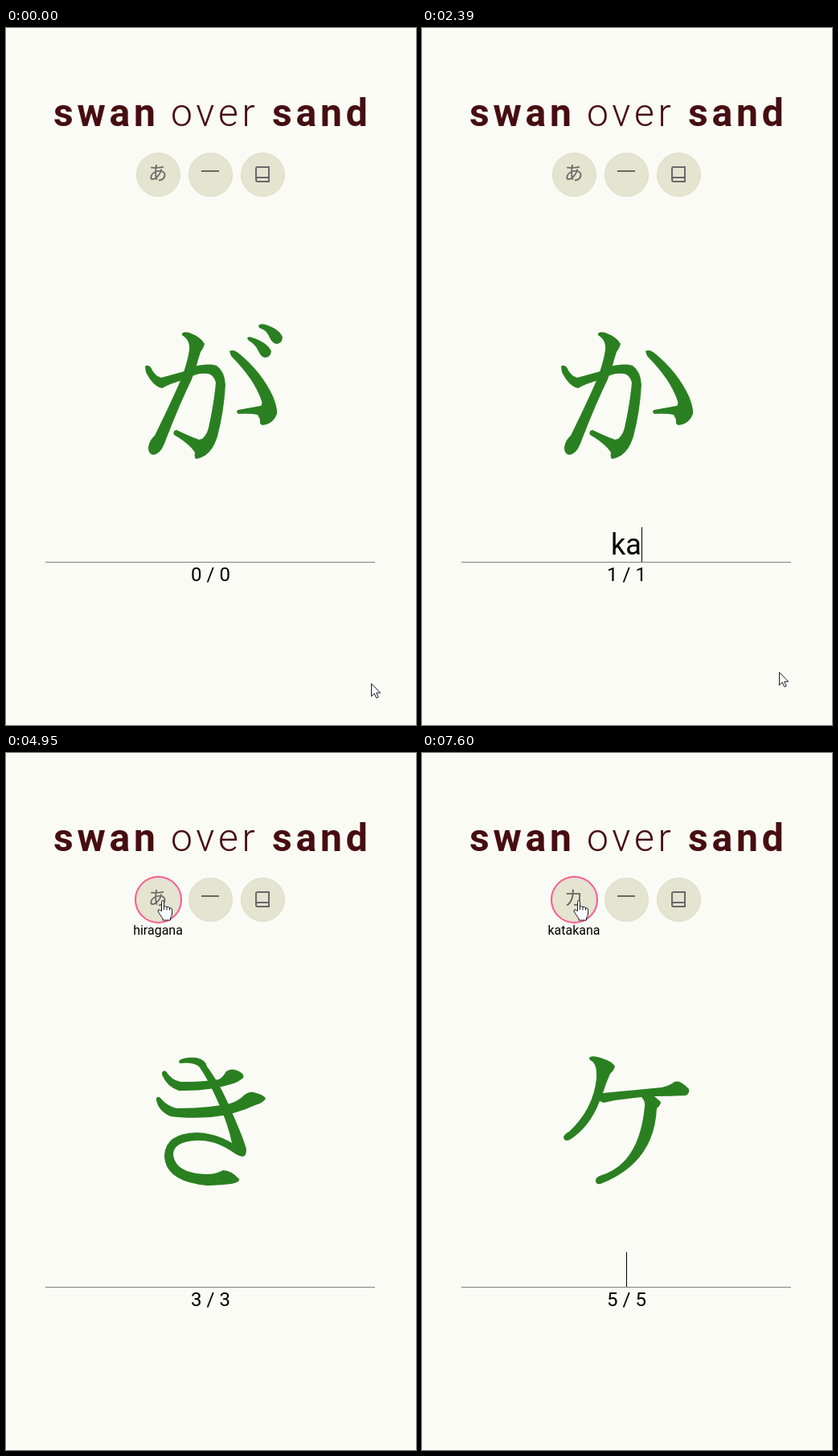
Recreate the animation shown at these times as an HTML page. Size 510 by 867 pixels, loop 8 s.

```html
<!DOCTYPE html>
<html lang="en">
<head>
<meta charset="utf-8">
<title>Kana quiz</title>
<style>
html, body { margin: 0; width: 100%; height: 100%; overflow: hidden; background: #fafbf5; }
svg { display: block; width: 510px; height: 867px; font-family: Roboto, sans-serif; }
text { white-space: pre; }
.mid { text-anchor: middle; }
.title { font-size: 48px; letter-spacing: .1em; font-weight: 700; fill: #470d10; }
.thin { font-weight: 300; }
.disc { fill: #e5e4d0; stroke: #dcdccc; }
.icon { font: 500 24px "Noto Sans CJK JP", "Noto Sans CJK", sans-serif; fill: #686868; }
.pointer { fill: #fff; stroke: #1c1c28; stroke-linejoin: round; }
</style>
</head>
<body>
<svg viewBox="0 0 510 867">
  <g class="title">
    <text x="59" y="122">swan</text>
    <text x="205" y="122" class="thin">over</text>
    <text x="331" y="122">sand</text>
  </g>
  <circle class="disc" cx="189.5" cy="182.5" r="27"/>
  <circle class="disc" cx="254.5" cy="182.5" r="27"/>
  <circle class="disc" cx="319.5" cy="182.5" r="27"/>
  <text id="mode" class="icon mid" x="188.7" y="189"></text>
  <path fill="#686868" d="M243 177h22v2h-22z"/>
  <path fill="none" stroke="#686868" stroke-width="2" d="M311 188V175q0-2 2-2h14v13h-14q-2 0-2 2.500t2 2.500h14v-5"/>
  <g id="hover">
    <circle cx="189.500" cy="182.500" r="28.500" fill="none" stroke="#fb5a8b" stroke-width="2"/>
    <text id="tip" class="mid" x="189" y="226" font-size="16"></text>
  </g>
  <path id="kana" fill="#2a8020"/>
  <path fill="#808080" d="M49 664h410v1H49z"/>
  <text id="typed" class="mid" x="254" y="655" font-size="36"></text>
  <rect id="caret" y="621" width="1" height="43"/>
  <text id="score" class="mid" x="254.500" y="688" font-size="24"></text>
  <path id="pointer" class="pointer"/>
</svg>
<script>
const $ = id => document.getElementById(id);

const ka = "M219 380Q221 377 228 379Q242 384 247 393Q246 398 242 403Q239 412 237 420L231 437Q215 470 197 517Q192 530 183 531Q177 530 177 522Q178 513 185 507Q207 462 219 434Q229 405 228 395Q227 387 219 382Z" +
  "M173 421Q176 418 180 422Q185 433 193 435L222 427L238 420Q252 417 262 420Q272 427 273 444Q271 478 263 508Q255 534 236 536Q234 534 235 528Q228 517 209 506Q207 501 212 500Q231 509 240 512L244 511Q250 506 252 497Q259 465 261 441Q258 431 251 430Q241 429 234 432L220 438Q205 442 194 448Q183 446 174 428Z" +
  "M278 402Q283 399 290 405Q318 428 332 458Q338 473 337 480Q332 493 319 494Q315 493 316 487L313 481Q303 479 289 480Q285 477 289 475L317 470Q319 468 318 464Q309 437 280 408Z";

// Voicing marks of the katakana, placed at (x, y)
const marks = (x, y) =>
  `M${x} ${y}q1-5 7-3q20 9 23 23q-1 9-8 10q-7-1-9-11q-4-13-13-18z` +
  `M${x + 25} ${y - 5}q1-4 7-2q19 9 22 23q-1 8-8 9q-7-1-8-9q-3-10-12-19z`;

const glyphs = {
  ka,
  ga: ka + "M300 386Q301 383 306 385Q325 391 330 402Q329 410 322 410Q317 409 314 402Q310 393 302 389Z" +
    "M314 370Q317 367 323 369Q341 375 344 385Q343 393 336 393Q330 391 327 383Q323 375 315 373Z",
  ku: "M262 383Q262 378 270 379Q286 385 294 399Q293 404 284 406Q258 432 222 458Q220 461 222 464Q275 486 296 515Q299 522 298 530Q295 537 290 537Q286 537 282 531Q259 497 212 470Q208 465 209 459Q211 450 218 446Q250 423 271 396Q271 390 262 385Z",
  ki: "M194 398Q195 394 199 396Q206 407 217 409Q245 409 265 406Q270 403 274 396Q281 391 290 396Q297 400 295 404Q290 409 280 412Q250 421 215 420Q200 415 194 400Z" +
    "M187 430Q188 426 192 429Q200 439 212 442Q245 442 275 437Q288 434 297 425Q302 421 308 422Q321 425 323 430Q320 435 310 438Q285 450 255 453Q225 455 205 452Q190 446 187 432Z" +
    "M215 383Q221 378 237 379Q249 382 250 390Q268 414 281 447Q295 478 299 493Q299 502 294 502Q288 501 280 495Q258 481 238 482Q208 483 208 500Q211 523 250 524Q261 524 270 519Q280 519 290 530Q291 534 280 536Q265 538 250 538Q197 533 197 500Q199 473 237 472Q261 473 281 485Q277 466 268 444Q252 406 240 390Q233 384 216 386Z",
  GU: "M229 388Q230 384 239 385Q257 388 260 396Q259 402 255 404L251 411Q275 409 295 403L304 397L318 402L324 410L316 420Q300 500 204 535Q199 535 199 529Q200 526 205 525Q285 490 300 416L298 414L247 421Q225 456 193 471Q187 471 188 467Q190 464 196 461Q228 435 238 401Q239 393 229 390Z" +
    marks(295, 368),
  GA: "M183 425Q183 419 188 419Q191 421 190 426Q197 433 207 433L244 428L258 425L303 416Q306 411 312 411L323 420Q327 425 324 431Q320 436 320 450Q318 490 310 515Q300 536 287 537Q279 536 279 531L283 526Q281 514 257 496Q253 492 258 490Q275 499 290 511Q296 510 299 500Q306 480 307 431L304 428L257 434L242 438Q222 442 204 446Q190 444 184 430Z" +
    "M233 385Q235 381 245 382Q264 386 268 392Q268 396 264 399L262 407Q261 435 246 473Q225 517 186 535Q180 536 180 532Q180 528 184 527Q224 502 242 438Q246 410 245 392Q242 388 234 387Z" +
    marks(293, 377),
  KE: "M208 380Q209 376 218 378Q237 383 240 390Q238 396 234 399Q229 410 225 423L298 416Q308 414 314 409Q321 406 332 418Q333 424 328 426Q310 427 289 427L297 434Q297 438 292 442Q289 510 222 536Q216 537 216 532Q216 528 221 526Q270 512 277 440Q278 433 273 428L240 432Q230 434 226 435L221 433Q209 465 184 481Q177 484 176 478Q177 474 183 471Q213 443 217 405Q218 385 209 382Z"
};

const arrow = "M.5.5v16l3.700-3.600 2.600 5.600 2.400-1.100-2.500-5.400h5z";
const hand = "M-1.500 12V2.500Q-1.500.500 0 .500T1.500 2.500V8Q4 7 5 8.500Q7.500 8 8.500 9.500Q11.500 9.500 11.500 12V17Q11.500 20 9.500 22V25H0V23Q-3 19-6 14Q-6 11-3.500 12L-1.500 14ZM1.500 8v4M5 8.500v4M8.500 9.500v3";

// Start time, glyph, score, typed answer
const states = [
  [0, "ga", 0, ""], [1370, "ga", 0, "g"], [1440, "ga", 0, "ga"],
  [1520, "ka", 1, ""], [2240, "ka", 1, "k"], [2390, "ka", 1, "ka"],
  [2470, "ku", 2, ""], [3100, "ku", 2, "k"], [3250, "ku", 2, "ku"],
  [3400, "ki", 3, ""], [5100, "GU", 3, ""], [6370, "GU", 3, "g"], [6440, "GU", 3, "gu"],
  [6670, "GA", 4, ""], [7450, "GA", 4, "ga"], [7600, "KE", 5, ""]
];
const caretFlips = [440, 970, 1370, 2090, 2240, 3020, 3100, 3950, 4480, 4950, 5100, 5650, 6200, 7220, 7450];
const hoverStart = 4640, click = 5100;

const clamp = v => Math.max(0, Math.min(1, v));
const mix = (a, b, p) => Math.round(a + (b - a) * p);

function pointerAt(t) {
  if (t < 130) {
    const p = t < 70 ? 0 : .5;
    return [mix(454, 444, p), mix(815, 801, p)];
  }
  const step = clamp(Math.floor((t - 3946) / 76) / 10);
  const p = Math.sin(step * Math.PI / 2);
  return [mix(444, 194.500, p), mix(801, 183, p)];
}

function draw(now) {
  const t = now % 8000;
  const [, glyph, score, typed] = states.findLast(s => s[0] <= t);
  $("kana").setAttribute("d", glyphs[glyph]);
  $("score").textContent = `${score} / ${score}`;
  $("typed").textContent = typed;

  const width = typed ? $("typed").getComputedTextLength() : 0;
  $("caret").setAttribute("x", Math.round(254 + width / 2));
  $("caret").style.opacity = caretFlips.filter(f => f <= t).length % 2;

  const katakana = t >= click;
  $("mode").textContent = katakana ? "カ" : "あ";
  $("tip").textContent = katakana ? "katakana" : "hiragana";
  $("hover").style.opacity = clamp((t - hoverStart + 60) / 220) * (t >= hoverStart);

  $("pointer").setAttribute("d", t >= hoverStart ? hand : arrow);
  $("pointer").setAttribute("transform", `translate(${pointerAt(t)})`);
}

const start = performance.now();
(function loop() {
  draw(performance.now() - start);
  requestAnimationFrame(loop);
})();
</script>
</body>
</html>
```
